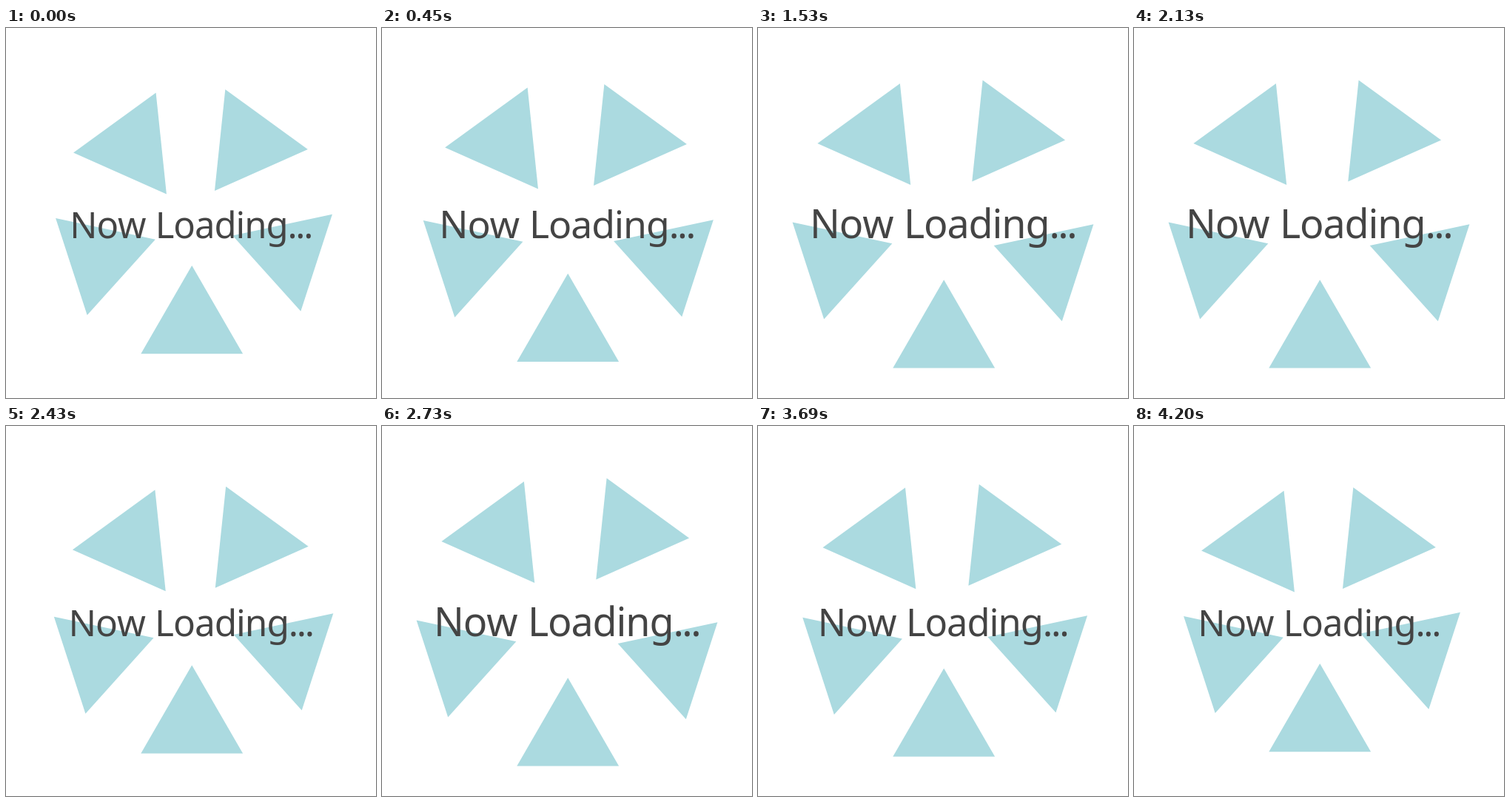
Write an HTML page that moves like this. It is 500x500 px and loops after 4500 ms.

```html
<!DOCTYPE html>
<html lang="en">
<head>
<meta charset="utf-8">
<title>Now Loading</title>
<style>
  html, body { margin: 0; height: 100%; overflow: hidden; background: #fff; }
  svg { display: block; width: 100%; height: 100%; }
  path { fill: #abdae0; }
  text {
    font: 49px "Noto Sans", "Open Sans", sans-serif;
    font-kerning: none;
    letter-spacing: -.021em;
    word-spacing: .03em;
    fill: #444;
  }
  .dots { letter-spacing: -.046em; }
</style>
</head>
<body>
<svg viewBox="0 0 500 500">
  <g id="blades"></g>
  <g id="label"><text x="-163.4">Now Loading<tspan class="dots">...</tspan></text></g>
</svg>
<script>
const STEP = 30, LOOP = 4500, LAST = 140, PULSE = 20;

// Resting centre, rotation, and outward travel of each triangle
const blades = [
  { x: 251.2, y: 400.5, turn: 0, dx: 0, dy: 21.3 },
  { x: 126.2, y: 310.3, turn: 72, dx: -22.8, dy: 6 },
  { x: 170.2, y: 160.2, turn: 144, dx: -11.9, dy: -13.9 },
  { x: 328.7, y: 155.7, turn: 216, dx: 8.1, dy: -13.9 },
  { x: 381.8, y: 305, turn: 288, dx: 13.9, dy: 15 },
];

const group = document.getElementById("blades");
const label = document.getElementById("label");

for (const b of blades) {
  b.el = document.createElementNS(group.namespaceURI, "path");
  b.el.setAttribute("d", "M0-79.5 68.9 39.75H-68.9Z");
  group.append(b.el);
}

function draw(now) {
  const step = Math.min(Math.floor(now % LOOP / STEP), LAST);
  const p = 1 - Math.abs(step % PULSE / (PULSE / 2) - 1);
  for (const b of blades) {
    const x = b.x + b.dx * p, y = b.y + b.dy * p;
    b.el.setAttribute("transform", `translate(${x} ${y}) rotate(${b.turn})`);
  }
  label.setAttribute("transform", `translate(249.6 284) scale(${1 + .11 * p})`);
}

const start = performance.now();
function tick() {
  draw(performance.now() - start);
  requestAnimationFrame(tick);
}
tick();
</script>
</body>
</html>
```
